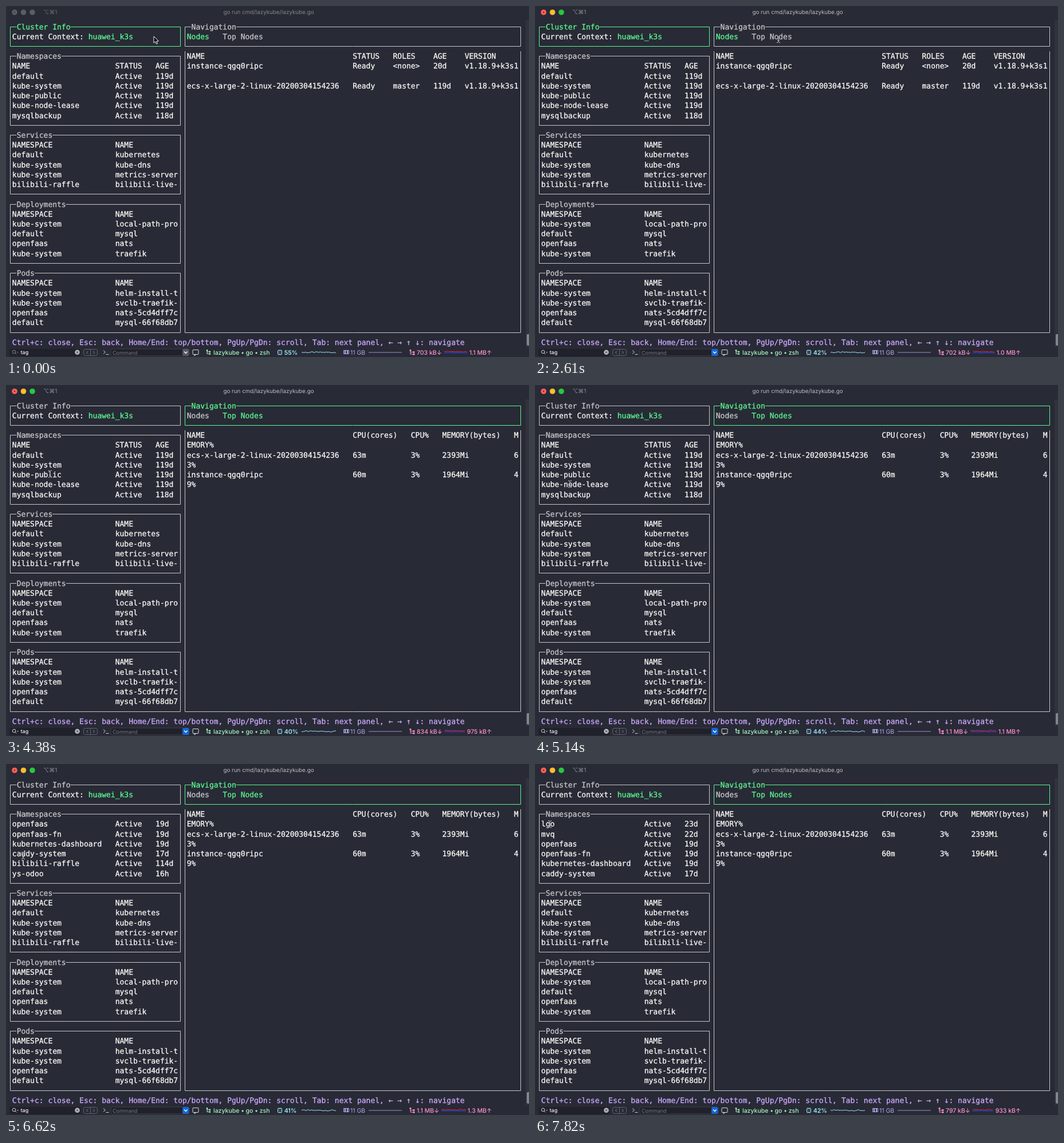
Animation of 913x613 px, one loop 8 s. Source, as an HTML page with a canvas:

```html
<!DOCTYPE html>
<html lang="en">
<head>
<meta charset="utf-8">
<title>Terminal</title>
<style>
html, body { margin: 0; width: 100%; height: 100%; overflow: hidden; background: #282a36; }
canvas { display: block; }
</style>
</head>
<body>
<canvas id="stage" width="913" height="613"></canvas>
<script>
const ctx = document.getElementById('stage').getContext('2d');
const LOOP = 8000;
const BG = '#282a36', WHITE = '#f8f8f2', GRAY = '#c7c7c7', GREEN = '#5af78e';
const PURPLE = '#caa9fa', CYAN = '#9aedfe', PINK = '#ff92d0';
const MONO = '13px "DejaVu Sans Mono", monospace';
const CELL = 7.82, LINE = 17.22;

const colX = c => 3 + c * CELL;
const rowY = r => 36 + r * LINE;
const edgeX = c => Math.round(colX(c + 0.5)) + 0.5;
const edgeY = r => Math.floor(rowY(r) + 0.2) + 0.5;

// Latest entry whose start time has passed
const at = (steps, t) => steps.filter(s => s[0] <= t).pop();

function line(points, color, width = 1) {
  ctx.strokeStyle = color;
  ctx.lineWidth = width;
  ctx.beginPath();
  points.forEach(([x, y], i) => i ? ctx.lineTo(x, y) : ctx.moveTo(x, y));
  ctx.stroke();
}

function disc(x, y, r, color) {
  ctx.fillStyle = color;
  ctx.beginPath();
  ctx.arc(x, y, r, 0, 7);
  ctx.fill();
}

function roundBox(x, y, w, h, r, fill, stroke) {
  ctx.beginPath();
  ctx.roundRect(x, y, w, h, r);
  if (fill) { ctx.fillStyle = fill; ctx.fill(); }
  if (stroke) { ctx.strokeStyle = stroke; ctx.lineWidth = 1; ctx.stroke(); }
}

function label(text, x, y, color, size = 10.5, weight = 500, align = 'left') {
  ctx.font = `${weight} ${size}px Inter, "DejaVu Sans", sans-serif`;
  ctx.textAlign = align;
  ctx.fillStyle = color;
  ctx.fillText(text, x, y);
  ctx.textAlign = 'left';
  return ctx.measureText(text).width;
}

function put(text, col, row, color = WHITE) {
  const y = rowY(row) + 4.6;
  ctx.font = MONO;
  ctx.fillStyle = ctx.strokeStyle = color;
  ctx.lineWidth = 0.3;
  [...text].forEach((ch, i) => {
    if (ch === ' ') return;
    ctx.fillText(ch, colX(col + i), y);
    ctx.strokeText(ch, colX(col + i), y);
  });
}

function table(rows, col, row, stops) {
  rows.forEach((r, i) => r.split('|').forEach((s, j) => put(s, col + stops[j], row + i)));
}

function panel(title, c0, c1, r0, r1, color = GRAY) {
  const x0 = edgeX(c0), x1 = edgeX(c1), y0 = edgeY(r0), y1 = edgeY(r1);
  line([[colX(c0 + 2) - 0.5, y0], [x0, y0], [x0, y1], [x1, y1], [x1, y0],
    [colX(c0 + 2 + title.length), y0]], color);
  put(title, c0 + 2, r0, color);
}

const NAMESPACES = [
  'NAME|STATUS|AGE', 'default|Active|119d', 'kube-system|Active|119d',
  'kube-public|Active|119d', 'kube-node-lease|Active|119d', 'mysqlbackup|Active|118d',
  'lgo|Active|23d', 'mvq|Active|22d', 'openfaas|Active|19d', 'openfaas-fn|Active|19d',
  'kubernetes-dashboard|Active|19d', 'caddy-system|Active|17d',
  'bilibili-raffle|Active|114d', 'ys-odoo|Active|16h'
];
const SERVICES = ['NAMESPACE|NAME', 'default|kubernetes', 'kube-system|kube-dns',
  'kube-system|metrics-server', 'bilibili-raffle|bilibili-live-'];
const DEPLOYMENTS = ['NAMESPACE|NAME', 'kube-system|local-path-pro', 'default|mysql',
  'openfaas|nats', 'kube-system|traefik'];
const PODS = ['NAMESPACE|NAME', 'kube-system|helm-install-t', 'kube-system|svclb-traefik-',
  'openfaas|nats-5cd4dff7c', 'default|mysql-66f68db7'];
const NODES = ['NAME|STATUS|ROLES|AGE|VERSION', 'instance-qgq0ripc|Ready|<none>|20d|v1.18.9+k3s1',
  '', 'ecs-x-large-2-linux-20200304154236|Ready|master|119d|v1.18.9+k3s1'];
const TOP_NODES = ['NAME|CPU(cores)|CPU%|MEMORY(bytes)|M', 'EMORY%',
  'ecs-x-large-2-linux-20200304154236|63m|3%|2393Mi|6', '3%',
  'instance-qgq0ripc|60m|3%|1964Mi|4', '9%'];

const ACTIVATE = 510, SWITCH = 3430;
const SCROLL = [[0, 0], [5230, 1], [5410, 2], [5560, 3], [5700, 4], [5840, 5], [5980, 6],
  [6120, 7], [6300, 8], [7040, 7], [7560, 6]];
const CPU = [[0, 55], [900, 49], [1550, 42], [2700, 40], [4530, 44], [5500, 43], [6330, 41], [7300, 42]];
const NET = [[0, '703 kB', '1.1 MB'], [900, '757 kB', '1.1 MB'], [1770, '702 kB', '1.0 MB'],
  [2750, '768 kB', '1.0 MB'], [3540, '834 kB', '975 kB'], [4560, '1.1 MB', '1.1 MB'],
  [6270, '1.1 MB', '1.3 MB'], [7130, '797 kB', '933 kB']];
const PATH = [[0, 258.5, 54], [770, 258.5, 54], [1310, 426, 58], [1490, 426, 58],
  [1600, 425, 58], [2610, 425, 58], [2950, 427, 55], [3370, 427, 55], [3540, 419, 55],
  [3720, 419, 55], [4500, 54, 162], [4700, 54, 164], [5140, 61, 173], [5300, 61, 173],
  [6620, 30, 160], [7100, 30, 160], [7820, 26, 105], [LOOP, 26, 105]];

function pointer(t) {
  const i = PATH.findIndex(p => p[0] > t);
  const [t0, x0, y0] = PATH[i - 1], [t1, x1, y1] = PATH[i];
  const k = (t - t0) / (t1 - t0), e = k * k * (3 - 2 * k);
  return [x0 + (x1 - x0) * e, y0 + (y1 - y0) * e];
}

function drawArrow(x, y) {
  ctx.beginPath();
  [[0, 0], [0, 11.5], [2.7, 9], [4.6, 13.3], [6.5, 12.5], [4.7, 8.4], [8.3, 8.2]]
    .forEach(([dx, dy]) => ctx.lineTo(x + dx, y + dy));
  ctx.closePath();
  ctx.fillStyle = '#000';
  ctx.fill();
  ctx.strokeStyle = '#fff';
  ctx.lineWidth = 1;
  ctx.stroke();
}

function drawBeam(x, y) {
  const shape = (color, width) => {
    line([[x - 3, y - 6], [x - 1, y - 5.6], [x, y - 4.5], [x, y + 4.5], [x - 1, y + 5.6], [x - 3, y + 6]], color, width);
    line([[x + 3, y - 6], [x + 1, y - 5.6], [x, y - 4.5]], color, width);
    line([[x + 3, y + 6], [x + 1, y + 5.6], [x, y + 4.5]], color, width);
    line([[x - 1.7, y + 2], [x + 1.7, y + 2]], color, width);
  };
  shape('rgba(20,20,28,.7)', 2.2);
  shape('#e8e8e8', 1);
}

const noise = n => { const s = Math.sin(n * 12.9898) * 43758.5453; return s - Math.floor(s); };

function graph(x0, x1, y, amp, seed, color) {
  const points = [];
  for (let x = x0, i = 0; x <= x1; x += 2.5, i++) points.push([x, y - amp * noise(i + seed)]);
  line(points, color);
}

function drawTitleBar(active) {
  const lights = active ? ['#ff5f57', '#febc2e', '#28c840'] : Array(3).fill('#5b5d66');
  lights.forEach((c, i) => disc(15 + i * 15.5, 11, 4.8, c));
  disc(15, 11, 1.2, active ? '#8c1d18' : '#3a3c46');
  label('⌥⌘1', 65, 14, active ? '#8f9198' : '#6c6e77', 10, 400);
  label('go run cmd/lazykube/lazykube.go', 458.5, 14, active ? '#bcbdc1' : '#82848c', 9.8, 400, 'center');
}

function drawScrollbar() {
  ctx.fillStyle = '#30323d';
  ctx.fillRect(907, 25, 6, 571);
  roundBox(909, 573, 5, 20, 2, '#85868b');
}

function drawStatusBar(t, active) {
  const base = 608.5, tick = Math.floor(t / 950);
  // Search field
  roundBox(6, 599, 124, 13, 3, '#20212b');
  const lens = active ? '#d0d0d3' : '#85868d';
  ctx.strokeStyle = lens;
  ctx.lineWidth = 1;
  ctx.beginPath();
  ctx.arc(14, 604, 2.8, 0, 7);
  ctx.stroke();
  line([[16, 606], [18.3, 608.3]], lens);
  line([[19, 604], [20.5, 605.5], [22, 604]], lens);
  label('tag', 25.5, 608, '#f0f0f0', 9, 500);
  disc(124.5, 604.8, 4.3, '#b9bac0');
  line([[122.8, 603.1], [126.2, 606.5]], BG);
  line([[126.2, 603.1], [122.8, 606.5]], BG);
  roundBox(135.5, 599.5, 24, 11, 3, null, '#60626b');
  line([[147.5, 600], [147.5, 610]], '#60626b');
  line([[143, 602.5], [140.5, 605], [143, 607.5]], '#85878f');
  line([[152, 602.5], [154.5, 605], [152, 607.5]], '#85878f');

  // Command field
  line([[170, 601.5], [173.5, 604.5], [170, 607.5]], '#d0d0d0');
  line([[174.5, 608.5], [179.5, 608.5]], '#d0d0d0');
  roundBox(183, 599, 136, 12, 2, '#20212b', '#3c3e48');
  label('Command', 186, 608.5, '#74767f', 9, 400);
  roundBox(308, 599, 11.5, 12, 2.5, active ? '#1467d8' : '#565861');
  line([[311, 603.5], [313.8, 606.5], [316.6, 603.5]], '#fff', 1.3);
  roundBox(326, 600.5, 10, 8, 1, null, '#d8d8d8');
  line([[329, 608.5], [329, 611], [332, 608.5]], '#d8d8d8');

  // Branch
  const green = '#a7f6bd';
  line([[351, 601], [351, 607.5], [356, 607.5]], green);
  line([[351, 604], [355, 604]], green);
  disc(351, 601.5, 1.4, green);
  disc(355.8, 604, 1.4, green);
  disc(355.8, 607.7, 1.4, green);
  label('lazykube • go • zsh', 362, base, green);

  // Processor
  roundBox(474.5, 601.5, 7, 7, 1, 'rgba(154,237,254,.15)', CYAN);
  for (let i = 0; i < 3; i++) {
    const o = 475.5 + i * 2.5;
    line([[o, 600], [o, 601]], 'rgba(154,237,254,.5)');
    line([[o, 609], [o, 610]], 'rgba(154,237,254,.5)');
  }
  label(at(CPU, t)[1] + '%', 485.7, base, CYAN, 10.5, 600);
  graph(516, 576, 606, 2.2, tick + 3, CYAN);

  // Memory
  const violet = '#b5a7f0';
  roundBox(589.5, 601.5, 9, 6, 0, null, violet);
  ctx.fillStyle = violet;
  ctx.fillRect(591, 602, 2, 6);
  ctx.fillRect(595, 602, 2, 6);
  label('11 GB', 601, base, violet, 10.5, 400);
  line([[633, 605], [691, 605]], '#9d91d2');

  // Network
  line([[706, 602], [706, 608], [711, 608]], PINK);
  line([[706, 604.5], [711, 604.5]], PINK);
  roundBox(704.5, 600, 3, 3, 1, PINK);
  roundBox(710.5, 603, 3, 3, 1, PINK);
  roundBox(710.5, 606.7, 3, 3, 1, PINK);
  const [, down, up] = at(NET, t);
  const left = 717 + label(down + '↓', 717, base, PINK);
  const right = 848 - label(up + '↑', 848, base, PINK, 10.5, 500, 'right');
  const g0 = left + 4, g1 = right - 3;
  line([[g0, 606], [g1, 606]], '#2c3fb5');
  graph(g0, g1, 605.5, 2, tick + 40, '#2f47d8');
  graph(g0, g1, 604.5, 2, tick + 11, '#f01c2c');
}

function draw(t) {
  const active = t >= ACTIVATE, top = t >= SWITCH;
  ctx.textRendering = 'geometricPrecision';
  ctx.fillStyle = BG;
  ctx.fillRect(0, 0, 913, 613);
  drawTitleBar(active);
  drawScrollbar();

  panel('Cluster Info', 0, 38, 0, 2, top ? GRAY : GREEN);
  put('Current Context:', 1, 1);
  put('huawei_k3s', 18, 1, GREEN);

  const offset = at(SCROLL, t)[1];
  panel('Namespaces', 0, 38, 3, 10);
  table(NAMESPACES.slice(offset, offset + 6), 1, 4, [0, 23, 32]);
  [['Services', SERVICES, 11], ['Deployments', DEPLOYMENTS, 18], ['Pods', PODS, 25]]
    .forEach(([title, rows, r]) => {
      panel(title, 0, 38, r, r + 6);
      table(rows, 1, r + 1, [0, 23]);
    });

  panel('Navigation', 39, 114, 0, 2, top ? GREEN : GRAY);
  put('Nodes', 40, 1, top ? GRAY : GREEN);
  put('Top Nodes', 48, 1, top ? GREEN : GRAY);

  const x0 = edgeX(39), x1 = edgeX(114), bottom = edgeY(31);
  line([[x0, 79], [x0, bottom], [x1, bottom], [x1, 79]], GRAY);
  if (top) table(TOP_NODES, 40, 3, [0, 37, 50, 57, 73]);
  else table(NODES, 40, 3, [0, 37, 46, 55, 62]);

  put('Ctrl+c: close, Esc: back, Home/End: top/bottom, PgUp/PgDn: scroll, ' +
    'Tab: next panel, ← → ↑ ↓: navigate', 1, 32, PURPLE);
  drawStatusBar(t, active);

  if (t < 360) drawArrow(258, 53);
  else drawBeam(...pointer(t));
}

const start = performance.now();
function frame() {
  draw((performance.now() - start) % LOOP);
  requestAnimationFrame(frame);
}
frame();
</script>
</body>
</html>
```
